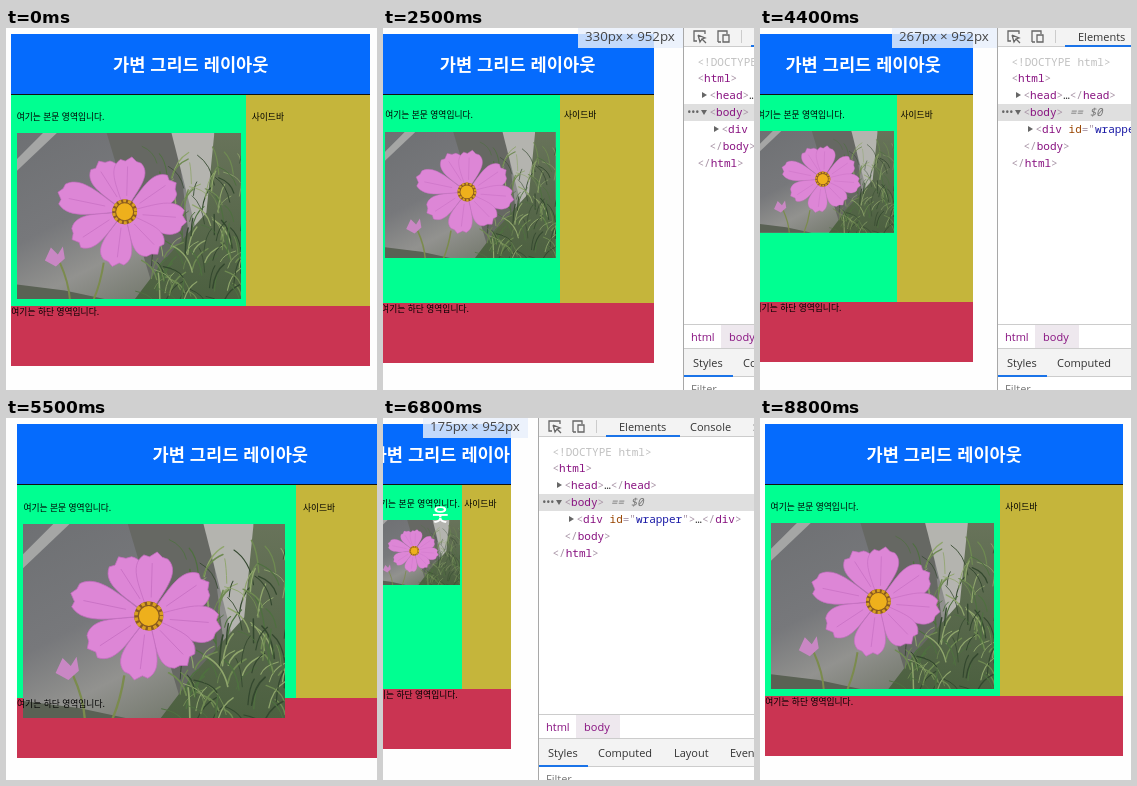
These frames come from a looping animation (371 px wide and 362 px high, 9500 ms). An HTML page:

```html
<!DOCTYPE html>
<html lang="ko">
<head>
<meta charset="utf-8">
<title>가변 그리드 레이아웃</title>
<style>
html, body { margin: 0; width: 100%; height: 100%; overflow: hidden; background: #fefefe; }
#stage { position: relative; width: 371px; height: 362px; overflow: hidden; }

#wrapper { position: absolute; top: 6px; font: 500 8.75px/11.7px "Noto Sans CJK KR", "Noto Sans CJK", sans-serif; color: #000; }
header { height: 60px; border-bottom: 1px solid #111; background: #056bfd; color: #fff;
  font-size: 17.6px; font-weight: 700; line-height: 60px; text-align: center; }
main, aside { height: 200px; padding: 1.5%; }
main { float: left; width: 62.5%; background: #00ff91; }
aside { float: right; width: 31.49%; background: #c5b53b; }
#wrapper p { margin: 10.4px 0 10.5px; }
#photo { display: block; width: 100%; max-width: 262px; aspect-ratio: 225 / 167; }
footer { clear: both; height: 60px; background: #ca3452; }

#size { position: absolute; top: 0; width: 98px; height: 20px; padding-left: 7px; overflow: hidden;
  background: rgba(232, 240, 252, .83); color: #444; font: 13.3px/17px "Open Sans", sans-serif; white-space: pre; }

#tools { position: absolute; top: 0; width: 480px; height: 362px; background: #fff;
  border-left: 1px solid #a8a8a8; box-sizing: border-box; color: #333; font: 11px/18px "Open Sans", sans-serif; white-space: nowrap; }
#tools > * { position: absolute; }
.bar { left: 0; right: 0; box-sizing: border-box; background: #f3f3f3; border: solid #ccc; border-width: 0 0 1px; }
.bar > * { position: absolute; top: 0; }
.bar svg { left: 0; }
.bar i { height: 2px; background: #1a73e8; }
#dom { top: 25.5px; left: 0; right: 0; font: 11px/16.85px "Noto Sans Mono", "DejaVu Sans Mono", monospace; color: #a894a6; white-space: pre; }
#dom div { padding-left: 13.5px; position: relative; height: 16.85px; }
#dom .in { padding-left: 25.5px; }
#dom .in2 { padding-left: 37.5px; }
#dom .on { background: #dfdfdf; }
#dom b { font-weight: 400; color: #881280; }
#dom u { text-decoration: none; color: #994500; }
#dom q { quotes: none; color: #1a1aa6; }
#dom em { color: #777; }
#dom s { color: #333; text-decoration: none; }
#dom .dots { position: absolute; left: 2px; letter-spacing: -2.6px; color: #666; }
.arrow::before { content: ""; position: absolute; margin: 5px 0 0 -8px; border: solid transparent;
  border-width: 3.5px 0 3.5px 5px; border-left-color: #666; }
.on.arrow::before { margin: 6px 0 0 -9px; border-width: 5px 3.5px 0; border-color: #666 transparent; }
</style>
</head>
<body>
<div id="stage">
  <div id="wrapper">
    <header>가변 그리드 레이아웃</header>
    <main>
      <p>여기는 본문 영역입니다.</p>
      <svg id="photo" viewBox="0 0 225 167" preserveAspectRatio="none">
        <defs>
          <linearGradient id="ground" x2=".7" y2="1">
            <stop offset="0" stop-color="#6e7073"/><stop offset=".45" stop-color="#77787b"/>
            <stop offset=".7" stop-color="#92928f"/><stop offset="1" stop-color="#6d7365"/>
          </linearGradient>
          <linearGradient id="bush" x2="0" y2="1">
            <stop offset="0" stop-color="#68735a"/><stop offset="1" stop-color="#4c6040"/>
          </linearGradient>
        </defs>
        <rect width="225" height="167" fill="url(#ground)"/>
        <path d="M26 0H40L0 38V26Z" fill="#a5a6a5"/>
        <path d="M90 0H160L180 167H140Z" fill="#666863"/>
        <path d="M155 0H198L210 70L183 110Z" fill="#b4b4af"/>
        <path d="M198 0H225V167H118L150 125L190 80Z" fill="url(#bush)"/>
        <path d="M0 167V152L48 158L90 167Z" fill="#5a6154"/>
        <g id="leaves" fill="none" stroke-linecap="round"></g>
        <path d="M87 130Q84 150 77 167M43 130Q52 150 53 167" fill="none" stroke="#7b8b4d" stroke-width="2"/>
        <path d="M28 128L34 115L41 122L46 114L48 126L39 134Z" fill="#c987c4"/>
        <g id="petals" fill="#dd86d6" stroke="#c56dc1" stroke-width=".6"></g>
        <circle cx="108" cy="79" r="12.5" fill="#8a5a20"/>
        <circle cx="108" cy="79" r="11" fill="none" stroke="#d9a020" stroke-width="3" stroke-dasharray="3 2"/>
        <circle cx="108" cy="79" r="8.5" fill="#eeb01c"/>
      </svg>
    </main>
    <aside><p>사이드바</p></aside>
    <footer>여기는 하단 영역입니다.</footer>
  </div>

  <div id="tools">
    <div class="bar" style="top:0;height:19px">
      <svg width="60" height="18" fill="none" stroke="#666" stroke-width="1.3">
        <path d="M13 13H10V3H21V6M14 7L21 10L18 11L22 15M14 7L16 14L18 11M34 14V3H43V6M34 14H37M39 7H45V14H39Z"/>
        <path d="M57.5 2V15" stroke="#ccc" stroke-width="1"/>
      </svg>
      <span style="left:80px">Elements</span><span style="left:151px">Console</span><span style="left:214px">Sources</span>
      <i style="left:67px;width:74px;top:17px"></i>
    </div>
    <div id="dom"><div style="color:#c0c0c0">&lt;!DOCTYPE html&gt;</div><div>&lt;<b>html</b>&gt;</div><div class="in arrow">&lt;<b>head</b>&gt;<s>…</s>&lt;/<b>head</b>&gt;</div><div class="in on arrow"><span class="dots">•••</span>&lt;<b>body</b>&gt;<em> == $0</em></div><div class="in2 arrow">&lt;<b>div</b> <u>id</u>="<q>wrapper</q>"&gt;<s>…</s>&lt;/<b>div</b>&gt;</div><div class="in">&lt;/<b>body</b>&gt;</div><div>&lt;/<b>html</b>&gt;</div></div>
    <div class="bar" style="top:296px;height:25px;background:#fff;border-top-width:1px;line-height:23px;color:#881280">
      <span style="left:37px;width:44px;height:23px;background:#eee8ee"></span>
      <span style="left:7px">html</span><span style="left:45px">body</span>
    </div>
    <div class="bar" style="top:321px;height:28px;line-height:27px">
      <span style="left:9px">Styles</span><span style="left:59px">Computed</span><span style="left:135px">Layout</span><span style="left:191px">Event Listeners</span>
      <i style="left:0;width:49px;top:26px"></i>
    </div>
    <span style="left:7px;top:352px;color:#777">Filter</span>
  </div>
  <div id="size"></div>
</div>

<script>
const $ = id => document.getElementById(id);
const LOOP = 9500, STEP = 100;

// [time, viewport width] while the splitter is dragged
const drag = [
  [0, 430.6], [1800, 430.6], [1900, 428.6], [2500, 330], [3100, 213], [3600, 150],
  [4000, 150], [4100, 165], [4400, 267], [5000, 455], [5200, 508], [5400, 508],
  [5500, 510], [5600, 490], [6400, 165], [6500, 150], [6700, 150], [6800, 175],
  [7300, 426], [7500, 426], [7600, 428], [7900, 429.6], [LOOP, 429.6]
];

function viewport(t) {
  const i = drag.findIndex(k => k[0] > t);
  const [t0, a] = drag[i - 1], [t1, b] = drag[i];
  return a + (b - a) * (t - t0) / (t1 - t0);
}

function drawPhoto() {
  const tips = [[-25, -49], [7, -53], [50, -28], [60, 10], [32, 41], [-12, 53], [-51, 27], [-65, -19]];
  $('petals').innerHTML = tips.map(([x, y]) => {
    const l = Math.hypot(x, y), a = Math.atan2(y, x) * 180 / Math.PI;
    return `<path transform="translate(108 79) rotate(${a})" d="M0 0C${l * .4} -9 ${l * .75} -24 ${l - 2} -11L${l - 3} -6L${l + 2} 0L${l - 2} 5L${l - 3} 10C${l * .75} 23 ${l * .4} 9 0 0M${l * .3} 0L${l * .85} -3"/>`;
  }).join('');

  let seed = 7;
  const rnd = () => (seed = seed * 16807 % 2147483647) / 2147483647;
  const greens = ['#6f8a52', '#34482f', '#8fa56c', '#4f7040'];
  let out = '';
  for (let i = 0; i < 130; i++) {
    const x = 225 - 95 * rnd() ** 1.4, y = 30 + 145 * rnd();
    const dx = 40 * rnd() - 20, dy = -8 - 22 * rnd();
    out += `<path d="M${x} ${y}q${dx * .2} ${dy * .7} ${dx} ${dy}" stroke="${greens[i % 4]}" stroke-width="${.7 + .8 * rnd()}"/>`;
  }
  $('leaves').innerHTML = out;
}

function render(now) {
  const t = Math.floor(now % LOOP / STEP) * STEP;
  const view = viewport(t);
  const width = 140.8 + .853 * (view - 175);
  // the panel runs ahead of the page during the fast drag
  const lead = t >= 6800 && t < 7300 ? 10 : 0;

  $('wrapper').style.width = width + 'px';
  $('wrapper').style.left = .0845 * width - 25 + 'px';
  $('tools').style.left = Math.round(view - 30 + lead) + 'px';
  $('size').style.left = Math.round(view - 135) + 'px';
  $('size').style.visibility = t >= 1900 && t < 8800 ? 'visible' : 'hidden';
  $('size').textContent = `${Math.round(view)}px × 952px`;
}

function tick() {
  render(performance.now());
  requestAnimationFrame(tick);
}

drawPhoto();
tick();
</script>
</body>
</html>
```
